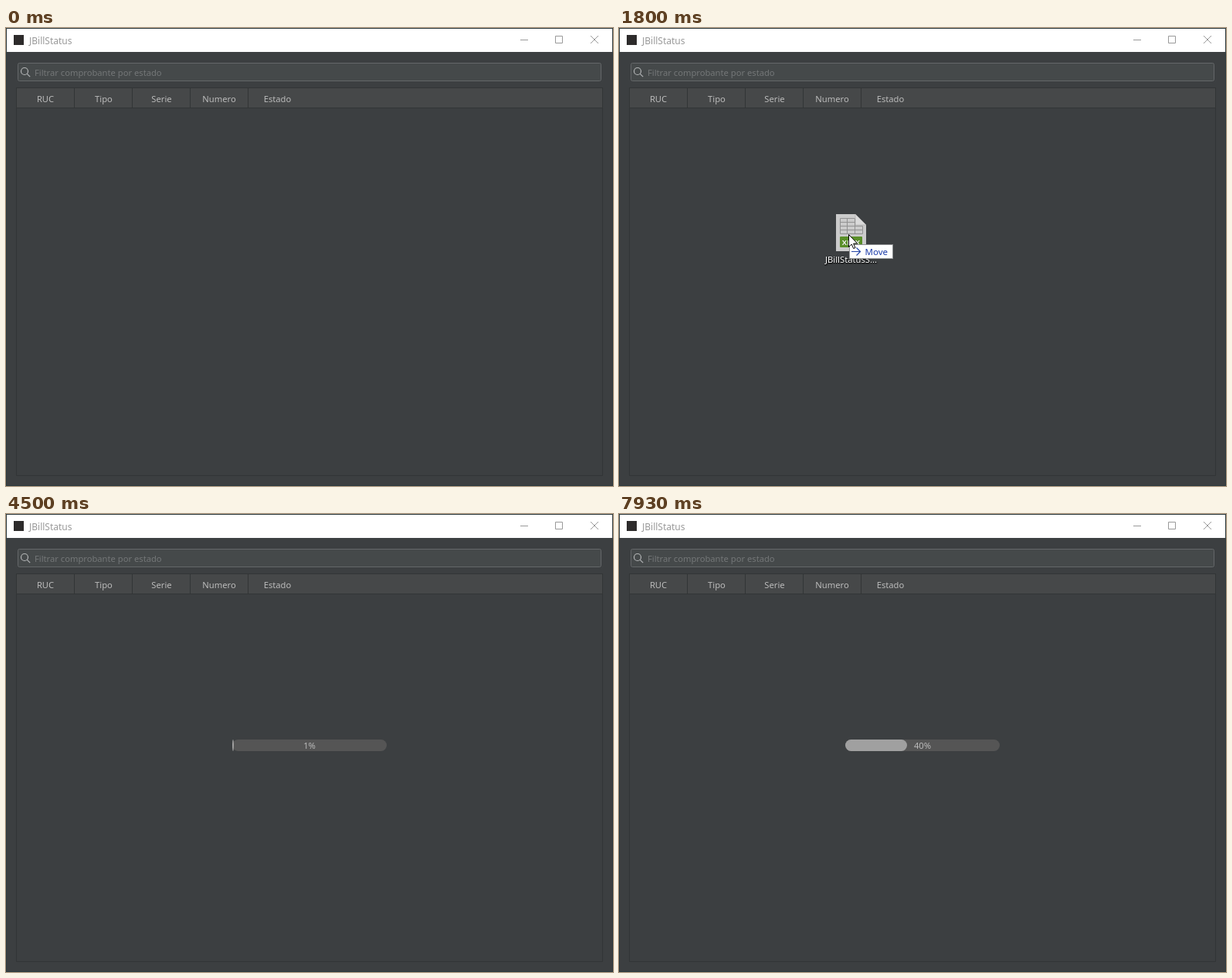
An HTML page for the animation above (8000 ms loop, 786 by 593 pixels).

```html
<!DOCTYPE html>
<html lang="es">
<head>
<meta charset="utf-8">
<title>JBillStatus</title>
<style>
  html, body { margin: 0; width: 100%; height: 100%; overflow: hidden; background: #3c3f41; }
  svg { display: block; width: 786px; height: 593px; }
  text { font: 11.2px "Noto Sans", "Open Sans", sans-serif; fill: #bbb; }
  .mid { text-anchor: middle; }
  .line { fill: none; stroke: #323536; }
  .glyph { fill: none; stroke: #999; }
  .grid { fill: none; stroke: #929292; }
  #caption { fill: #fff; text-shadow: 1px 1px 2px #000, 0 1px 1px #000; }
</style>
</head>
<body>
<svg viewBox="0 0 786 593">
  <rect width="786" height="593" fill="#3c3f41"/>

  <!-- title bar -->
  <rect width="786" height="31" fill="#fff"/>
  <rect x="10" y="9" width="13" height="13" fill="#2d2b2b"/>
  <text x="30" y="20.5" style="font-size:12px;fill:#999">JBillStatus</text>
  <path class="glyph" d="M666 15.5h10M711.5 10.5h9v9h-9z"/>
  <path class="glyph" d="M757 10l10 10M767 10l-10 10"/>
  <rect class="line" x=".5" y=".5" width="785" height="592" style="stroke:#2b3a3e"/>

  <!-- search field -->
  <rect x="15.5" y="45.5" width="755" height="23" rx="2" fill="#45494a" stroke="#646769"/>
  <g fill="none" stroke="#b4b6b7" stroke-width="1.2">
    <circle cx="24" cy="56" r="4.5"/><path d="M27.3 59.3l3.9 3.9"/>
  </g>
  <text x="37" y="62" style="fill:#747778">Filtrar comprobante por estado</text>

  <!-- table -->
  <rect x="14" y="78" width="758" height="25" fill="#464849"/>
  <rect class="line" x="13.5" y="77.5" width="759" height="502"/>
  <path class="line" d="M14 103.5h758M88.5 78v25M163.5 78v25M238.5 78v25M313.5 78v25"/>
  <g class="mid">
    <text x="51" y="96">RUC</text>
    <text x="126.5" y="96">Tipo</text>
    <text x="201.5" y="96">Serie</text>
    <text x="276" y="96">Numero</text>
    <text x="351.5" y="96">Estado</text>
  </g>

  <!-- progress bar -->
  <g id="bar">
    <rect x="293" y="292" width="200" height="15" rx="7.5" fill="#555"/>
    <rect id="fill" x="293" y="292" height="15" ry="7.5" fill="#a0a0a0"/>
    <text id="percent" class="mid" x="393" y="304"></text>
  </g>

  <!-- dragged file -->
  <g id="file">
    <path d="M0 0h25l14 14v34H0z" fill="#cbcbcb"/>
    <path d="M25 0l14 14H25z" fill="#dadada" stroke="#a5a5a5" stroke-width=".6"/>
    <path class="grid" d="M24 5.500H5.500V25.500H34.500V15.500H5.500M5.500 10.500H24M5.500 20.500H34.500M14.500 5.500V25.500M24.500 5.500V25.500"/>
    <rect x="5" y="29" width="29" height="14" rx="1" fill="#5a8f29"/>
    <text class="mid" x="19.500" y="39.500" style="font-size:9.500px;font-weight:700;fill:#eee">XLSX</text>
    <text id="caption" x="-14" y="62.500">JBillStatusS...</text>
    <rect x="17.500" y="39.500" width="56" height="18" fill="#fff" stroke="#8f9193"/>
    <path d="M20 48.500h11.500M26.500 43.500l5 5l-5 5" fill="none" stroke="#2747a8" stroke-width="1.200"/>
    <text x="37.500" y="53" style="font-size:11.500px;fill:#1a3aa8">Move</text>
  </g>
  <path id="cursor" d="M.5 .5v16l3.700-3.500l2.500 5.500l2.300-1l-2.400-5.400h5.100z" fill="#fff" stroke="#000"/>
</svg>

<script>
const LOOP = 8000;
const START = 1400, END = 2030, DROP = 2630, LOAD = 2900;
const $ = id => document.getElementById(id);
const bar = $('bar'), fill = $('fill'), percent = $('percent'), file = $('file'), cursor = $('cursor');

// time, x, y of the dragged file
const path = [[1400, 15, 215], [1530, 181, 249], [1800, 282, 241], [2030, 354, 240]];

// first change, last change, number of one-percent steps
const bursts = [[4500, 4500, 1], [4670, 4830, 3], [5000, 5730, 10], [5830, 6600, 10],
                [6730, 7530, 12], [7630, 7630, 1], [7770, 7930, 3]];

const clamp = v => Math.max(0, Math.min(1, v));

// Latest redraw time at or before t, on evenly spaced steps
function redraw(t, from, to, count) {
  const gap = (to - from) / (count - 1);
  const i = Math.min(count - 1, Math.floor((t - from + 4) / gap));
  return from + i * gap;
}

function slope(i, k) {
  if (i === path.length - 1) return 0;
  const a = path[Math.max(0, i - 1)], b = path[i + 1];
  return (b[k] - a[k]) / (b[0] - a[0]);
}

// Smooth curve through the path points
function along(t, k) {
  let i = 0;
  while (i < path.length - 2 && t >= path[i + 1][0]) i++;
  const a = path[i], b = path[i + 1], d = b[0] - a[0];
  const u = clamp((t - a[0]) / d), v = 1 - u;
  return v * v * (1 + 2 * u) * a[k] + u * u * (3 - 2 * u) * b[k]
    + d * u * v * (v * slope(i, k) - u * slope(i + 1, k));
}

function place(el, x, y) {
  el.setAttribute('transform', `translate(${Math.round(x)} ${Math.round(y)})`);
}

function show(el, on) {
  el.style.display = on ? '' : 'none';
}

function progress(t) {
  return bursts.reduce((sum, [from, to, n]) => {
    if (t < from) return sum;
    if (n === 1) return sum + 1;
    return sum + Math.min(n, 1 + Math.floor((t - from + 4) * (n - 1) / (to - from)));
  }, 0);
}

function draw(t) {
  show(file, t >= START && t < DROP);
  show(cursor, t >= START && t < LOAD);
  show(bar, t >= LOAD);

  if (t >= START && t < DROP) {
    const s = redraw(t, START, END, 20);
    const x = along(s, 1), y = along(s, 2);
    place(file, x, y);
    place(cursor, x + 16 - 10 * clamp((s - 1800) / 230), y + 26);
  } else if (t >= DROP && t < LOAD) {
    const u = (redraw(t, DROP, LOAD, 7) - DROP) / 225;
    place(cursor, 360 - 341 * u * (0.4 + 0.6 * u), 266 + 12 * u);
  } else if (t >= LOAD) {
    const p = progress(t);
    fill.setAttribute('width', 2 * p);
    fill.setAttribute('rx', Math.min(p, 7.5));
    percent.textContent = p + '%';
  }
}

function tick() {
  draw(performance.now() % LOOP);
  requestAnimationFrame(tick);
}
tick();
</script>
</body>
</html>
```
